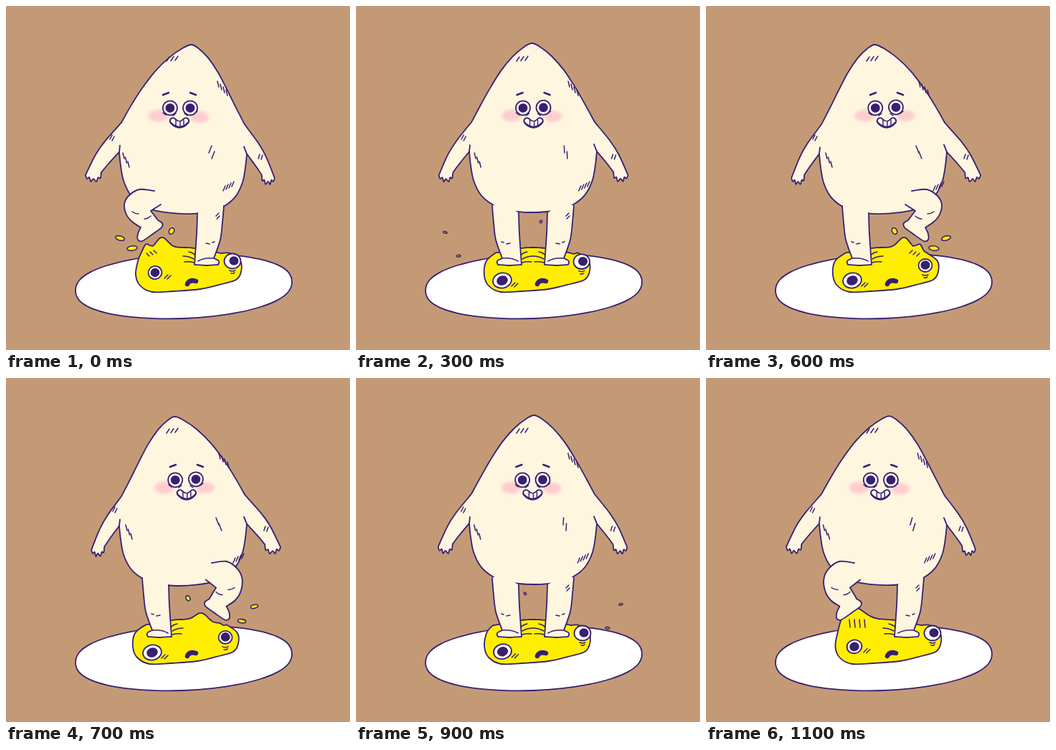
These frames come from a looping animation (480 px wide and 480 px high, 1.2 s). An HTML page:

```html
<!DOCTYPE html>
<html lang="en">
<head>
<meta charset="utf-8">
<title>Egg stomp</title>
<style>
html, body { margin: 0; width: 100%; height: 100%; overflow: hidden; background: #c49a76; }
svg { display: block; width: 100vw; height: 100vh; }
</style>
</head>
<body>
<svg id="stage" viewBox="0 0 480 480" fill="none" stroke="#38206f" stroke-width="1.8" stroke-linecap="round" stroke-linejoin="round">
  <defs><filter id="soft" x="-40%" y="-40%" width="180%" height="180%"><feGaussianBlur stdDeviation="2.2"/></filter></defs>
  <g id="art"></g>
</svg>
<script>
const INK = '#38206f', CREAM = '#fff6e0', YOLK = '#ffee00', STEP = 100, COUNT = 12, AXIS = 247;

// Geometry
const pts = s => s.split(' ').map(p => p.split(',').map(Number));
const num = v => +v.toFixed(1);
const lerp = (a, b, k) => a + (b - a) * k;
const rev = a => [...a].reverse();
const flip = a => a.map(([x, y]) => [2 * AXIS - x, y]);
const range = (n, f) => Array.from({ length: n }, (_, k) => f(k));
const bump = (x, mid, width) => Math.exp(-(((x - mid) / width) ** 2));

// Smooth curve through points, continuing from the first one
function curve(a, closed) {
  const n = a.length, at = i => closed ? a[(i + n) % n] : a[Math.max(0, Math.min(n - 1, i))];
  return range(closed ? n : n - 1, i => {
    const [p, q, r, t] = [at(i - 1), at(i), at(i + 1), at(i + 2)];
    return 'C' + [0, 1].map(j => num(q[j] + (r[j] - p[j]) / 6)) + ' ' +
      [0, 1].map(j => num(r[j] - (t[j] - q[j]) / 6)) + ' ' + r.map(num);
  }).join('');
}
const from = p => 'M' + p.map(num);
const chain = segs => from(segs[0][0]) + segs.map(s => curve(s)).join('');
const loop = a => from(a[0]) + curve(a, true) + 'Z';

// Drawing
const fill = c => `fill="${c}"`;
const path = (d, attrs = '') => `<path d="${d}" ${attrs}/>`;
const thin = d => path(d, 'stroke-width="1.5"');
const oval = (x, y, rx, ry, attrs, turn = 0) =>
  `<ellipse rx="${num(rx)}" ry="${num(ry)}" transform="translate(${num(x)} ${num(y)}) rotate(${turn})" ${attrs}/>`;
const shift = (x, y, art) => `<g transform="translate(${num(x)} ${num(y)})">${art}</g>`;
const mirrored = (on, art) => on ? `<g transform="translate(${2 * AXIS} 0) scale(-1 1)">${art}</g>` : art;
const hatch = (x, y, dx, dy, n, sx, sy) =>
  thin(range(n, k => `M${num(x + k * sx)} ${num(y + k * sy)}l${num(dx)} ${dy}`).join(''));

// Left half of the upright body, from the tip down
const HALF = [
  '236,57 220,70 203,90 187,115 174,138 161,162',
  '161,162 140,188 128,207 115,236',
  '115,236 117,241 120,239 122,245 125,241 129,245 131,239 134,240 135,232',
  '135,232 144,220 158,203',
  '158,203 160,222 164,243 174,263 189,276 208,284'
].map(pts);

// Raised left leg: thigh, foot, calf, groin
const RAISED = [
  '207,258 186,256 171,265 165,277 168,291 176,301 188,309',
  '188,309 184,318 184,326 190,328 205,318 217,309 218,303 212,299',
  '212,299 206,291 202,286', '202,286 208,282 216,277'
].map(pts);
const PLANTED = ['267,289 266,318 263,361', '263,361 280,362 296,361', '296,361 297,356 290,352', '290,352 299,326 302,302 304,279'].map(pts);
const RIM = pts('311,345 325,356 326,371 319,382 299,388 269,395 232,398 202,399 185,390 179,375 182,356');

const sway = i => {
  const a = Math.PI * i / 6;
  return Math.cos(a) + .12 * Math.sin(3 * a);
};
// 2 is the top of a stride, below 0 the foot is down
const lift = i => 2 - Math.abs((i + 6) % COUNT - 6);

// The tip swings one way, the arms trail the other
const lean = s => ([x, y]) => {
  const swing = y < 160 ? 11 * ((160 - y) / 105) ** 2 : -.1 * Math.max(0, Math.abs(x - AXIS) - 90);
  return [x + s * swing, y + .015 * s * (x - AXIS) + 2 * s * s];
};

function plate() {
  const soft = v => Math.sign(v) * Math.abs(v) ** .87;
  return path(loop(range(24, k => {
    const a = k * Math.PI / 12, x = 151 * Math.cos(a);
    return [248 + x, 391 + 45 * soft(Math.sin(a)) - .04 * x];
  })), fill('#fff'));
}

function body(s) {
  const bend = lean(s);
  const l = HALF.map(seg => seg.map(bend)), r = HALF.map(seg => rev(flip(seg).map(bend)));
  const d = chain([
    [...r[0], bend([AXIS, 52]), ...l[0]], l[1], l[2], l[3],
    [...l[4], bend([AXIS + 5 * s, 288]), ...r[4]], r[3], r[2], r[1]
  ]);
  return path(d + 'Z', fill(CREAM)) + path(from(l[4][0]) + 'l1-9' + from(r[3][0]) + 'l-4-10') +
    hatch(224, 77, 4, -6, 3, 6, -.5) +
    hatch(296 - s, 105, 2, 8, 4, 4, 4) +
    hatch(165 - 2 * s, 205, 2, 8, 3, 3.5, 6) +
    hatch(290 - 3 * s, 195, -4 * s, 10, 2, 4, 8) +
    hatch(310 - 7 * s, 258, 3, -7, 4, 4, -2) +
    hatch(147 - 2 * s, 186, 3, -6, 2, 3, 2) +
    hatch(358 - 4 * s, 207, -2, 6, 2, 4, 1);
}

function face(s) {
  const blush = 'fill="#fdcdce" stroke="none" filter="url(#soft)"';
  const eye = (x, y) => oval(x, y, 10, 10, fill('#fff')) + oval(x, y, 5.5, 5.5, fill(INK));
  const grin = path('M-9-3Q0 7 9-3', 'stroke-width="10.5"') +
    path('M-9-3.4Q0 5.4 9-3.4', 'stroke="#fff" stroke-width="6"') + thin('M-5-4v7M1-2v6M6-4v6');
  return oval(217 - 4.5 * s, 153, 14, 8.5, blush) + oval(274 - 4 * s, 154 + s, 13, 8, blush) +
    eye(232.6 - 3.7 * s, 142.3) + eye(261 - 4 * s, 141.8 + s / 2) +
    shift(-4 * s, 0, thin('M223 149l4 3M237 153l4-3M253 150l4 3M267 150l4-3')) +
    shift(-5 * s, 0, path('M224 124l8-3M262 121l8 3', 'stroke-width="2.6"')) +
    shift(AXIS - 5 * s, 163.5, grin);
}

function leg(height, right) {
  if (height < 0) {
    const d = chain(PLANTED);
    return mirrored(!right, path(d + 'L290 272Z', fill(CREAM) + ' stroke="none"') + path(d) +
      thin('M268 356Q276 351 290 352M279 331l5 1M288 330l3-1')) +
      (right ? hatch(293, 293, 4, -4, 2, 1, 4) : '');
  }
  // A lower foot stretches the shin and leaves the hip in place
  const low = 1 - height / 2;
  const reach = ([x, y]) => {
    const k = low * Math.min(1, Math.max(0, (y - 258) / 40));
    return [x - 3 * k, y + 19 * k];
  };
  const d = chain(RAISED.map(seg => seg.map(reach)));
  return mirrored(right, path(d + 'L218 262Z', fill(CREAM) + ' stroke="none"') + path(d) +
    shift(-2 * low, 11 * low, thin('M176 287q4 3 9 3M193 297q5 0 9-4')));
}

// Upper yolk edge: dragged up by the lifting foot, then snapping back
function yolkTop(h) {
  return range(23, k => {
    const x = 190 + 5 * k, rest = 346 - 9 * Math.sin(Math.PI * (x - 190) / 114);
    if (h > 3) return [x, rest - 11 * (h - 3) * bump(x, 205, 21)];
    return [x, rest - 5.7 * (3 - h) * bump(x, 217 + 4 * h, 12) - 12 * .2 ** h * bump(x, 196, 6)];
  });
}

function yolk(i) {
  const h = i % 6, s = sway(i), right = i >= 3 && i <= 8;
  const top = right ? rev(flip(yolkTop(h))) : yolkTop(h);
  const a = Math.max(0, s), b = Math.min(1, 1 + s);
  const [lx, ly, rx, ry] = [lerp(204, 208, a), lerp(383, 372, a), lerp(306, 316, b), lerp(362, 356, b)];
  const creases = thin('M247 349q8 0 15 4M249 357q7-1 13 1M255 343q6 1 9 5');
  const planted = n => lift(n) < 0;
  return path(loop([...RIM.map(([x, y]) => [x + 2 * s, y]), ...top]), fill(YOLK)) +
    mirrored(right, h > 3 ? hatch(200, 362 - 5 * h, 1, 11, 4, 7, 0) : h ? '' : hatch(196, 345, 4, 4, 3, 5, -2)) +
    mirrored(true, planted(i) ? creases : '') + (planted(i + 6) ? creases : '') +
    hatch(lx + 13, ly + 8, 5, -5, 2, 4, 1) +
    shift(rx, ry, thin('M-4 13q4 2 8 0M-2 17q3 1 5-1')) +
    oval(lx, ly, lerp(13, 9.5, a), lerp(10.5, 9, a), fill('#fff'), -12) +
    oval(lx, ly, lerp(7, 5.5, a), lerp(5.8, 5.2, a), fill(INK), -20) +
    oval(rx, ry, lerp(9.5, 11.5, b), lerp(9, 10.5, b), fill('#fff')) +
    oval(rx + 2 * b, ry - .5, 5.6, 5.4, fill(INK)) +
    path('M253 388Q256 381 265 384', 'stroke-width="6.5"');
}

function splash(i) {
  const n = i % 6;
  if (n > 4) return '';
  const size = 1 - .2 * n;
  const drop = (x, y, vx, vy, rx, ry, turn) =>
    oval(x + vx * n, y + vy * n + 1.2 * n * n, rx * size, ry * size, fill(YOLK) + ' stroke-width="1.6"', turn);
  return mirrored(i >= 6,
    drop(159, 324, -11.5, -6.3, 6.5, 3, 15) +
    drop(176, 338, -11, 0, 7, 3.3, -8) +
    drop(231, 314, 9, -8, 3.4, 4.6, 30));
}

const draw = i => plate() + yolk(i) + body(sway(i)) + leg(lift(i), false) + leg(lift(i + 6), true) +
  face(sway(i)) + splash(i);

const art = document.getElementById('art');
const start = performance.now();
let shown = -1;
function tick() {
  const i = Math.floor(Math.max(0, performance.now() - start) / STEP) % COUNT;
  if (i !== shown) art.innerHTML = draw(shown = i);
  requestAnimationFrame(tick);
}
tick();
</script>
</body>
</html>
```
